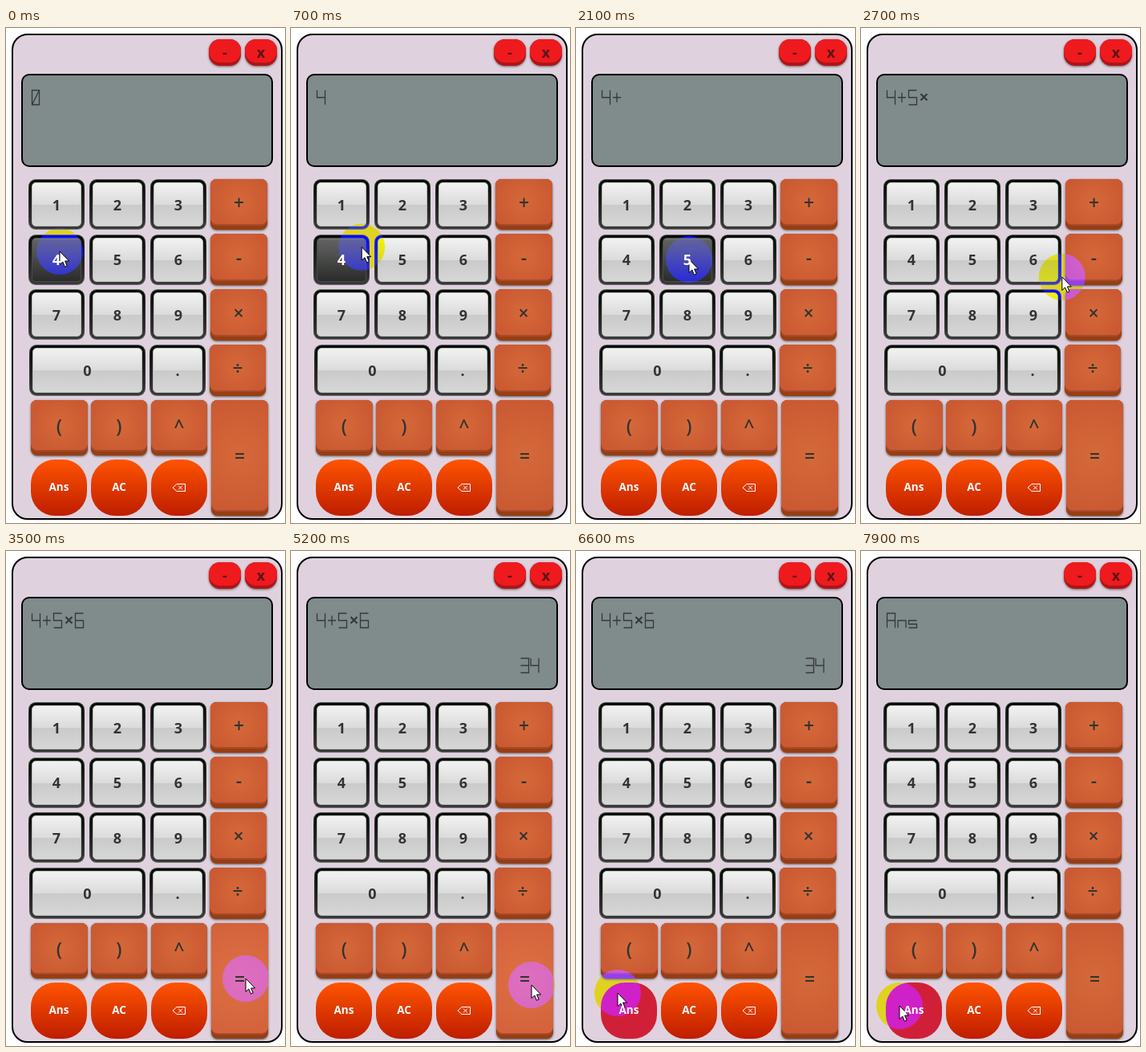
An HTML page for the animation above (8 s loop, 348x616 px).

```html
<!DOCTYPE html>
<html lang="en">
<head>
<meta charset="utf-8">
<title>Calculator</title>
<style>
html, body { margin: 0; width: 100%; height: 100%; overflow: hidden; background: #fff; }
#stage { position: absolute; left: 0; top: 0; width: 348px; height: 616px; overflow: hidden; isolation: isolate; background: #fff; }
#stage * { box-sizing: border-box; }
.case, .screen, .key, .key::before, .key::after, .key span, .halo, svg { position: absolute; }
.case { left: 7px; top: 7px; width: 338px; height: 605px; border: 2px solid #000; border-radius: 20px; background: #dfd2de; }
.screen { left: 19px; top: 57px; width: 314px; height: 116px; border: 2px solid #000; border-radius: 10px; background: #808b8c; }

.key { font: bold 18px "Open Sans", "Noto Sans", sans-serif; color: #333; }
.key span { inset: 0; z-index: 1; display: flex; align-items: center; justify-content: center; line-height: 1; }
.key::before, .key::after { content: ""; }

.num { border-radius: 9px; background: linear-gradient(#686868, #232723 25%, #373837 75%, #757575); }
.num::before { inset: 1px; border-radius: 8px; background: linear-gradient(#020b02, #3a3a3a); }
.num::after { inset: 4px; border-radius: 5px; border: 1px solid #bbb; background: linear-gradient(#f2f2f2, #dbdbdb 50%, #cacaca 51%, #d7d7d7); }
.num.hover { color: #fff; }
.num.hover::after { border-color: #4a4a4a; background: linear-gradient(#777, #606060 5%, #505250 35%, #2a2b2a); }

.op { border-radius: 8px; background: #973e13; box-shadow: 0 1px 3px rgba(0, 0, 0, .6); font-size: 23px; font-weight: 600; }
.op::before { inset: 0 0 5px; border-radius: 8px; background: #a8492a; }
.op::after { inset: 0 0 7px; border-radius: 8px; background: radial-gradient(circle farthest-side, #d5693a, #cb5a32); }
.op span { bottom: 5px; }
.op.hover::after { background: radial-gradient(circle farthest-side, #de7043, #d4633c); }

.round { border-radius: 30px; background: linear-gradient(#ff5400, #be1d00); color: #fff; font-size: 13.5px; }
.round.hover { background: #d02038; }

.win { border-radius: 14px; background: #b01416; box-shadow: 0 1px 3px rgba(0, 0, 0, .55); color: #5c1518; }
.win::before { inset: 0 0 4px; border-radius: 14px; background: #ee1a1e; }
.win span { bottom: 2px; }

.halo { left: -29px; top: -29px; width: 58px; height: 58px; border-radius: 50%; background: #00f; mix-blend-mode: difference; }
svg { left: 0; top: 0; overflow: visible; }
#lcd { fill: none; stroke: #34383b; stroke-width: 1.3; }
</style>
</head>
<body>
<div id="stage">
  <div class="case"></div>
  <div class="screen"></div>
  <svg id="lcd" width="348" height="616"><path id="input"/><path id="times" d="M74.5 82l8 8m0-8l-8 8" stroke-width="2.2"/><path id="result"/></svg>
  <div class="halo" id="halo"></div>
  <svg id="arrow" width="12" height="20"><path d="M0 0V16.5L3.8 13L6.4 19.2L9.2 18L6.6 12H11.6Z" fill="#fff" stroke="#000" stroke-linejoin="round"/></svg>
</div>
<script>
const LOOP = 8000, LAG = 50;
const $ = id => document.getElementById(id);
const halo = $('halo'), arrow = $('arrow');

// label, x, y, width, height, style
const layout = [
  ['-', 253, 14, 40, 33, 'win'], ['x', 298, 14, 40, 33, 'win'],
  ['0', 29, 394, 145, 64, 'num'], ['.', 179, 394, 70, 64, 'num'],
  ['+', 255, 188, 71, 63, 'op'], ['-', 255, 256, 71, 64, 'op'],
  ['×', 255, 325, 70, 64, 'op'], ['÷', 254, 394, 70, 64, 'op'],
  ['(', 31, 463, 71, 69, 'op'], [')', 106, 463, 70, 69, 'op'],
  ['^', 181, 463, 70, 69, 'op'], ['=', 256, 463, 71, 144, 'op'],
  ['Ans', 31, 537, 70, 70, 'round'], ['AC', 106, 537, 70, 70, 'round'],
  ['', 181, 537, 70, 70, 'round']
];
for (let i = 0; i < 9; i++)
  layout.push([i + 1, 28 + i % 3 * 76, 188 + Math.floor(i / 3) * 68.7, 70, 63, 'num']);

const keys = layout.map(([label, x, y, w, h, style]) => {
  const el = document.createElement('div');
  el.className = 'key ' + style;
  el.style.cssText = `left:${x}px;top:${y}px;width:${w}px;height:${h}px`;
  el.innerHTML = `<span>${label}</span>`;
  $('stage').insertBefore(el, halo);
  return { el, x, y, w, h };
});
keys[14].el.innerHTML =
  '<svg width="70" height="70" fill="none" stroke="#fff"><path d="M27 35L32 30.5H42.500V39.5H32ZM34 32.500l5 5m0-5l-5 5"/></svg>';

// Segment glyphs in a 10 by 18 cell
const glyphs = {
  '0': 'm0 0h9v18h-9zm0 18l9-18',
  '3': 'm0 0h10v18h-10m0-9h10',
  '4': 'm0 0v9h10m0-9v18',
  '5': 'm10 0h-10v9h10v9h-10',
  '6': 'm10 0h-10v18h10v-9h-10',
  '+': 'm5 3v12m-5-6h10',
  'A': 'm0 18v-18h10v18m-10-9h10',
  'n': 'm0 18v-9h10v9',
  's': 'm10 9h-10v4.500h10v4.500h-10'
};
const write = (text, x, y, step) =>
  [...text].map((c, i) => glyphs[c] ? `M${x + i * step} ${y}${glyphs[c]}` : '').join('');

// time, input line, result line
const entries = [
  [0, '0', ''], [400, '4', ''], [1350, '4+', ''], [2150, '4+5', ''],
  [2550, '4+5×', ''], [3000, '4+5×6', ''], [3900, '4+5×6', '34'], [7350, 'Ans', '']
];

// time, x, y of the pointer tip
const route = [
  [0, 67, 278], [600, 67, 278], [900, 130, 262], [1250, 285, 217], [1750, 285, 217],
  [2080, 141, 288], [2220, 141, 288], [2460, 289, 352], [2580, 287, 346],
  [2700, 251, 310], [2850, 216, 290], [3080, 216, 290], [3400, 299, 532],
  [3700, 299, 532], [4200, 300, 540], [5850, 300, 540], [6300, 178, 545],
  [6550, 58, 550], [6600, 52, 550], [6850, 46, 561], [7200, 48, 566], [LOOP, 48, 566]
];

function pointer(t) {
  const i = Math.max(1, route.findIndex(p => p[0] >= t));
  const [t0, x0, y0] = route[i - 1], [t1, x1, y1] = route[i];
  const k = (t - t0) / (t1 - t0);
  return [x0 + (x1 - x0) * k, y0 + (y1 - y0) * k];
}

let shown;
function draw(now) {
  const t = now % LOOP;
  const [x, y] = pointer(t);
  halo.style.transform = arrow.style.transform = `translate(${x}px,${y}px)`;

  const [hx, hy] = pointer(Math.max(0, t - LAG));
  for (const k of keys)
    k.el.classList.toggle('hover', hx >= k.x && hx < k.x + k.w && hy >= k.y && hy < k.y + k.h);

  const entry = entries.filter(e => e[0] <= t).pop();
  if (entry !== shown) {
    shown = entry;
    $('input').setAttribute('d', write(entry[1], 32.5, 77.5, 13.5));
    $('times').style.display = entry[1].includes('×') ? '' : 'none';
    $('result').setAttribute('d', write(entry[2], 286.5, 133.5, 12.5));
  }
}

const start = performance.now();
function tick() {
  draw(performance.now() - start);
  requestAnimationFrame(tick);
}
tick();
</script>
</body>
</html>
```
